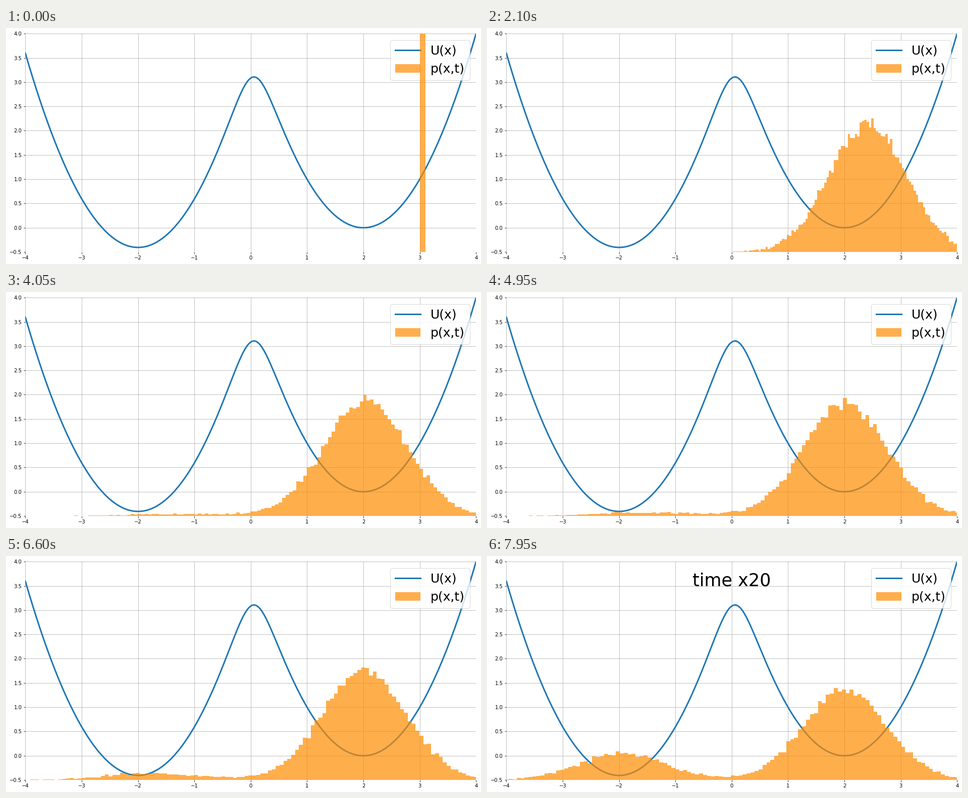
Recreate the animation shown at these times as a matplotlib script. Size 941 px wide and 470 px high, loop 8 s.

```python
import numpy as np
import matplotlib.pyplot as plt
from matplotlib.animation import FuncAnimation
from matplotlib.patches import Patch

WIDTH, HEIGHT, DPI = 941, 470, 72
INTERVAL, FRAMES = 50, 160
HOLD_MS, STEP_MS = 1500, 150
STEPS, FAST_FROM, SPEEDUP = 44, 41, 20
PARTICLES, BINS, DT = 40000, 140, 0.1
Y_MIN, Y_MAX = -0.5, 4.0

plt.rcParams.update({"font.family": "DejaVu Sans", "font.size": 10})


def potential(x):
    return -np.log(np.exp(-(x - 2) ** 2) + 1.5 * np.exp(-(x + 2) ** 2))


def force(x):
    left_weight = 1.5 / (1.5 + np.exp(8 * x))
    return -2 * (x - 2 + 4 * left_weight)


def simulate():
    """Langevin particles released at x = 3; one density histogram per step."""
    rng = np.random.default_rng(7)
    x = np.full(PARTICLES, 3.0)
    states = [(np.array([10.0]), np.array([3.0, 3.1]))]
    for step in range(1, STEPS + 1):
        substeps = 0 if step == 1 else SPEEDUP if step >= FAST_FROM else 1
        for _ in range(substeps):
            x = x + force(x) * DT + np.sqrt(2 * DT) * rng.standard_normal(PARTICLES)
        states.append(np.histogram(x, bins=BINS, density=True))
    return states


fig = plt.figure(figsize=(WIDTH / DPI, HEIGHT / DPI), dpi=DPI, facecolor="white")
ax_w, ax_h = 892.8, 434.88
ax = fig.add_axes([38.4 / WIDTH, 23.9 / HEIGHT, ax_w / WIDTH, ax_h / HEIGHT])
ax.set(xlim=(-4, 4), ylim=(Y_MIN, Y_MAX),
       xticks=np.arange(-4, 5), yticks=np.arange(Y_MIN, Y_MAX + 0.1, 0.5))
ax.grid(True)
for spine in ax.spines.values():
    spine.set_visible(False)

grid = np.linspace(-4, 4, 500)
curve, = ax.plot(grid, potential(grid), color="tab:blue", lw=3)
bar_style = dict(facecolor="darkorange", edgecolor="none", alpha=0.7)
ax.legend([curve, Patch(**bar_style)], ["U(x)", "p(x,t)"],
          fontsize=25, loc="upper right")

states = simulate()
bars = ax.stairs([0], [3, 3.1], baseline=Y_MIN, fill=True, lw=0, zorder=6, **bar_style)
speed_label = ax.text(-0.7, 3.5, "time x20", fontsize=35)
ax.set(xlim=(-4, 4), ylim=(Y_MIN, Y_MAX))


def update(frame):
    t = frame * INTERVAL
    step = 0 if t < HOLD_MS else min(STEPS, 1 + (t - HOLD_MS) // STEP_MS)
    density, edges = states[step]
    # A density of 1 fills the full height of the axes.
    bars.set_data(Y_MIN + (Y_MAX - Y_MIN) * density, edges, Y_MIN)
    speed_label.set_visible(step >= FAST_FROM)
    return bars, speed_label


anim = FuncAnimation(fig, update, frames=FRAMES, interval=INTERVAL,
                     repeat=True, repeat_delay=0)
plt.show()
```
